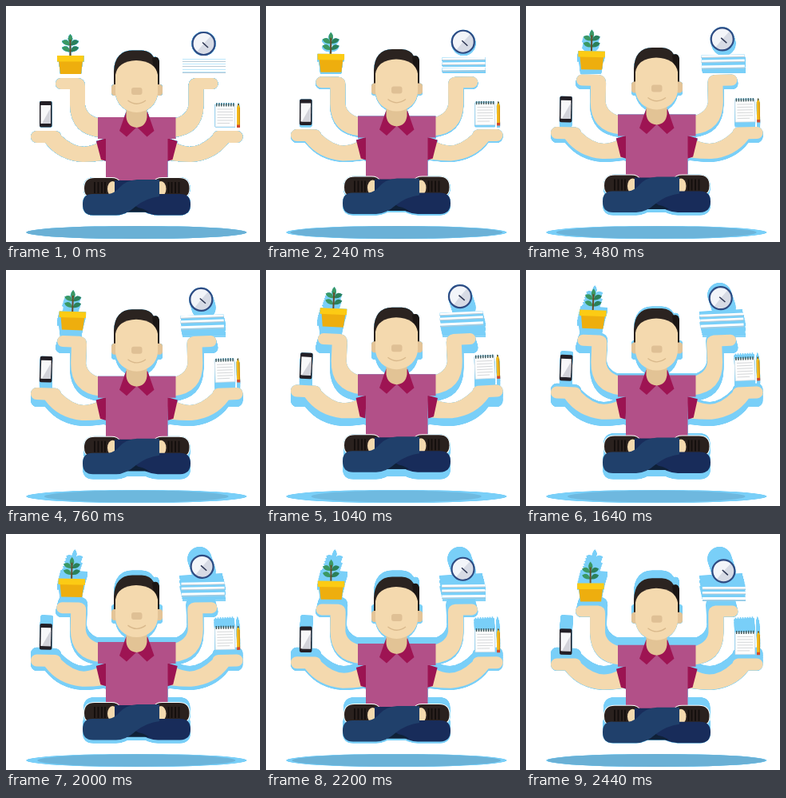
An HTML page without scripts that plays this animation: 318 by 295 pixels, repeating every 2520 ms.

```html
<!DOCTYPE html>
<html lang="en">
<head>
<meta charset="utf-8">
<title>Floating multitasker</title>
<style>
  @property --p { syntax: "<number>"; inherits: true; initial-value: 0; }
  @property --k { syntax: "<number>"; inherits: true; initial-value: 1; }

  html, body { margin: 0; width: 100%; height: 100%; overflow: hidden; background: #fff; }
  svg { display: block; width: 100%; height: 100%; }

  /* --p is the height of the float: 0 resting, 1 highest; --k scales it per copy */
  .float, .sweep { animation: float 2520ms cubic-bezier(.35, .17, .65, .83) infinite; }
  .sweep { animation-name: sweep; }
  .man  { transform: translateY(calc(var(--p) * var(--k) * -10px)); }
  .arm  { transform: rotate(calc(var(--p) * var(--k) * 3deg)); transform-origin: 118px 160px; }
  .prop { transform: translate(calc(var(--p) * var(--k) * -1px), calc(var(--p) * var(--k) * -4px)); }
  .shadow {
    fill: #6ab0d5;
    opacity: calc(1 - .4 * var(--p));
    transform: scale(calc(1 - .26 * var(--p)), calc(1 - .1 * var(--p)));
    transform-origin: 163px 283px;
  }

  @keyframes float {
    0%, 100% { --p: 0; }
    50% { --p: 1; }
  }
  @keyframes sweep {
    0% { --p: 0; }
    50%, 100% { --p: 1; }
  }
</style>
</head>
<body>
<svg viewBox="0 0 318 295">
  <defs>
    <filter id="flat" x="0" y="0" width="318" height="295" filterUnits="userSpaceOnUse" color-interpolation-filters="sRGB">
      <feGaussianBlur stdDeviation=".5"/>
      <feColorMatrix values="0 0 0 0 .475  0 0 0 0 .812  0 0 0 0 .973  0 0 0 1.6 0"/>
    </filter>

    <g id="limbs">
      <g fill="#f4d9ae">
        <path d="M69 90H90Q99 91 99 100V124Q101 137 118 141V164Q81 161 80 124V104H69A7 7 0 0 1 69 90Z"/>
        <path d="M38.500 156H62Q68 157 69 162Q84 176 98 176Q108 175 115 171L122 193Q108 195 96 195Q66 193 49 171H38.500A7.500 7.500 0 0 1 38.500 156Z"/>
      </g>
      <path d="M113 169L126 165V194L119 192Z" fill="#9b1452"/>
    </g>

    <path id="leaf" d="M0 0Q-8 1-10.500-5Q-3-10 0 0Z"/>
    <g id="leaves">
      <use href="#leaf" x="80.500" y="49"/>
      <use href="#leaf" x="80.500" y="57"/>
    </g>
    <g id="plant">
      <g fill="#3b9863">
        <path d="M80.500 35Q75 41 80.500 47Q86 41 80.500 35Z"/>
        <use href="#leaves"/>
        <use href="#leaves" transform="matrix(-1 0 0 1 161 0)" fill="#2b805a"/>
      </g>
      <path d="M80.500 42V62" stroke="#654d2c" stroke-width="2"/>
      <path d="M66 68H96L94 85H68Z" fill="#eeae0e"/>
      <path d="M64 62H97.500V69.500H64Z" fill="#fccb14"/>
    </g>

    <g id="phone">
      <rect x="42" y="119" width="15.500" height="32.500" rx="2" fill="#231f26"/>
      <path d="M43.500 124H56V147H43.500Z" fill="#f7f7f9"/>
      <path d="M56 127V147H45Z" fill="#d3d3da"/>
    </g>

    <g id="clock">
      <circle cx="247.500" cy="47" r="14" fill="#f3f5f9"/>
      <path d="M247.500 47L257 37A13.500 13.500 0 0 1 239 57Z" fill="#d7dbe5"/>
      <circle cx="247.500" cy="47" r="14" fill="none" stroke="#2f4b82" stroke-width="2.200"/>
      <path d="M246 45.500L253 52" stroke="#2a3350" stroke-width="1.500"/>
    </g>

    <g id="papers">
      <path d="M221 68H275M221 74H275M221 81H275" stroke="#fff" stroke-width="3"/>
      <path d="M221 69.500H275M221 75.500H275M221 83.500H275" stroke="#bdc9d3" stroke-width=".9"/>
    </g>

    <g id="notes">
      <path d="M262 123.500H286.500V151H262Z" fill="#fdfdfd" stroke="#dcdfe2" stroke-width=".7"/>
      <path d="M263 123.500H287" stroke="#3f5a5c" stroke-width="4" stroke-dasharray="1.500 1.500"/>
      <path d="M264.500 129H284M264.500 132.500H284M264.500 136H284M264.500 139.500H284M264.500 143H284M264.500 146.500H280" stroke="#d2d4d6" stroke-width=".9"/>
      <path d="M289 127L291 121.500L293 127V149H289Z" fill="#f3b91c"/>
      <path d="M290 124L291 121.500L292 124Z" fill="#3a2d25"/>
      <path d="M292.300 127V149" stroke="#d08c12"/>
      <path d="M289 148.500H293V152H289Z" fill="#cf4a2e"/>
    </g>

    <g id="shoe">
      <path d="M98 228Q98 215 111 215H132Q140 215 142 220V238H104Q98 237 98 228Z" fill="#2a211e" stroke="#fff" stroke-width="2" paint-order="stroke"/>
      <path d="M111 220V234M115.500 220V234M120 220V234M124 220V234" stroke="#120e0d" stroke-width="1.800"/>
      <ellipse cx="133.500" cy="228.500" rx="6.500" ry="9.500" fill="#f4d9ae"/>
    </g>

    <path id="lapel" d="M150.500 132L142 156L151 163.500L164 151Z"/>

    <g id="man" class="man">
      <g class="arm">
        <use href="#limbs"/>
        <g class="prop"><use href="#plant"/><use href="#phone"/></g>
      </g>
      <g transform="matrix(-1 0 0 1 327.500 0)">
        <g class="arm">
          <use href="#limbs"/>
          <g class="prop">
            <g transform="matrix(-1 0 0 1 327.500 0)">
              <use href="#clock"/><use href="#papers"/><use href="#notes"/>
            </g>
          </g>
        </g>
      </g>

      <path d="M115 139H212.500V166H202.500V219H125V166H115Z" fill="#b25088"/>
      <g fill="#9e1453">
        <use href="#lapel"/>
        <use href="#lapel" transform="matrix(-1 0 0 1 327.500 0)"/>
      </g>
      <path d="M150.500 125H176.500V139Q175 151 163.500 152Q152 151 150.500 139Z" fill="#e2c395"/>

      <path d="M135 99V82Q136 56 158 55.500H170Q181 56 185 64Q192 62 192 72V99Z" fill="#2b2320"/>
      <path d="M183 65Q192 61 192 72V99H188Z" fill="#1b1614"/>
      <g fill="#e4c497">
        <rect x="132" y="98" width="9" height="14" rx="4"/>
        <rect x="187" y="98" width="9" height="14" rx="4"/>
      </g>
      <path d="M137 86Q140 69 163 68Q187 69 190 86V108A26.500 25 0 0 1 137 108Z" fill="#f4d9ae"/>
      <rect x="157" y="102" width="13.500" height="9" rx="3" fill="#dfc095"/>
      <path d="M152.500 118Q163.500 126.500 175 118" fill="none" stroke="#d9b98c" stroke-width="1.300"/>

      <use href="#shoe"/>
      <use href="#shoe" transform="matrix(-1 0 0 1 327.500 0)"/>
      <path d="M145 257.500Q164 238 182 257.500Z" fill="#0f2138"/>
      <path d="M136 218H192V235H218Q231 235 231 248T218 261.500H190Q176 261 164 251L136 236Z" fill="#182c5a"/>
      <path d="M148 257.500Q163 247 179 257.500Z" fill="#0f2138"/>
      <path d="M192 217V238Q176 240 163 250Q150 261.500 138 261.500H109Q96 261.500 96 248T109 235H128Q136 234 142 227Q150 218 164 217Z" fill="#20406b"/>
    </g>
  </defs>

  <!-- Everything the figure has passed over stays blue until the loop restarts -->
  <g class="sweep" filter="url(#flat)">
    <ellipse cx="163.300" cy="283" rx="138" ry="8"/>
    <use href="#man" style="--k:0"/>
    <use href="#man" style="--k:.2"/>
    <use href="#man" style="--k:.4"/>
    <use href="#man" style="--k:.6"/>
    <use href="#man" style="--k:.8"/>
    <use href="#man"/>
  </g>

  <g class="float">
    <ellipse class="shadow" cx="163.300" cy="283" rx="138" ry="8"/>
    <use href="#man"/>
  </g>
</svg>
</body>
</html>
```
